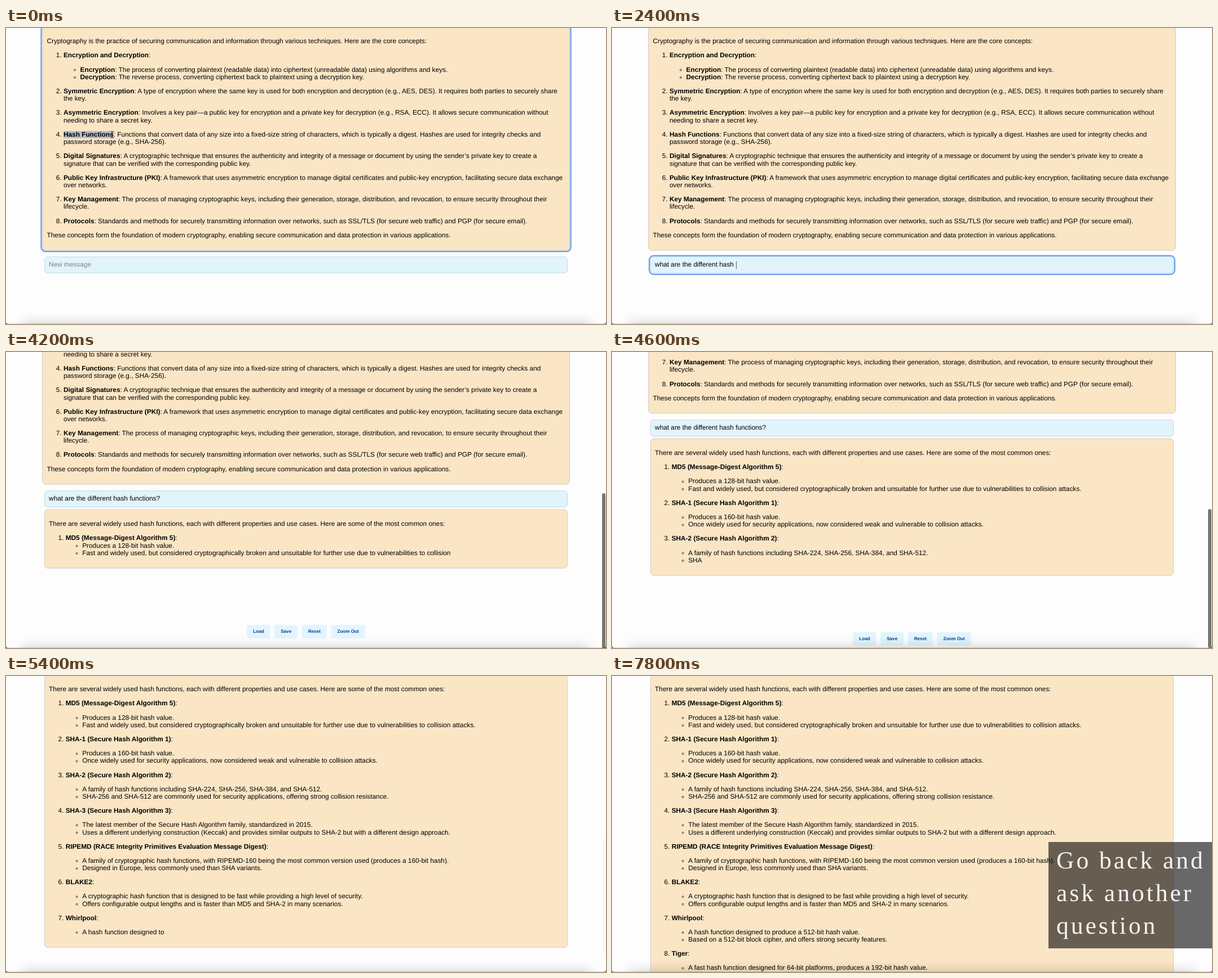
Recreate the animation shown at these times as an HTML page. Size 1064 px wide and 526 px high, loop 8000 ms.

```html
<!DOCTYPE html>
<html lang="en">
<head>
<meta charset="utf-8">
<title>Chat about cryptography</title>
<style>
html, body { margin: 0; width: 100%; height: 100%; overflow: hidden; background: #fdfdfe; }
body { position: relative; font-family: "Liberation Sans", Arial, sans-serif; text-rendering: geometricPrecision; }
#page { position: absolute; left: 0; top: 0; width: 1440px; height: 0; transform-origin: 0 0; font-size: 16px; line-height: 18px; color: #000; white-space: nowrap; }
.box { position: absolute; left: 92px; width: 1256px; box-sizing: border-box; padding: 10px; border: 1px solid #c3beb6; border-radius: 8px; background: #fae6c5; }
.box p { margin: 16px 0; }
.box ol { margin: 16px 0; padding-left: 40px; }
.box ul { margin: 0; padding-left: 40px; list-style: circle; }
.box.tight li p { margin: 0; }
#lesson { left: 87px; top: -3px; width: 1266px; height: 538px; }
#ask { top: 550px; height: 40px; background: #e1f4fc; border-color: #b9ccd4; white-space: pre; }
#ask.blank { color: #7c8285; }
#answer { top: 595px; }
.focus { outline: 3px solid #6a9be8; outline-offset: 1.5px; box-shadow: 0 0 0 1.5px #fff; }
.picked { background: #b2bbc8; }
#caret { position: absolute; top: 10px; width: 1.4px; height: 18px; background: #222; }
#tools { position: absolute; left: 0; width: 1440px; display: flex; justify-content: center; gap: 10px; }
#tools span { height: 32px; padding: 0 15px; border-radius: 5px; background: #e1f5fe; color: #0d3f8a; font: bold 11px/32px "Liberation Sans", Arial, sans-serif; }
#thumb { position: absolute; left: 1057px; width: 6px; border-radius: 3px; background: #757575; }
#mouse { position: absolute; left: 0; top: 0; width: 8px; height: 14px; }
#dock { position: absolute; left: 30px; right: 30px; top: 526px; height: 20px; box-shadow: 0 0 22px rgba(0,0,0,.22); }
#frame { position: absolute; inset: -10px 0 0; border-radius: 0 0 4px 4px; box-shadow: 0 0 0 4px #444, inset 0 -1px 0 rgba(0,0,0,.14); }
#note { position: absolute; left: 774px; top: 294.5px; width: 290px; height: 189.5px; box-sizing: border-box; padding: 4px 0 0 14px; background: rgba(0,0,0,.59); color: #f6f5f4; font: 43.5px/58px "Liberation Serif", "Times New Roman", serif; letter-spacing: 4px; white-space: nowrap; }
</style>
</head>
<body>
<div id="page">
  <div id="lesson" class="box">
    <p>Cryptography is the practice of securing communication and information through various techniques. Here are the core concepts:</p>
    <ol>
      <li><p><b>Encryption and Decryption</b>:</p>
        <ul>
          <li><b>Encryption</b>: The process of converting plaintext (readable data) into ciphertext (unreadable data) using algorithms and keys.</li>
          <li><b>Decryption</b>: The reverse process, converting ciphertext back to plaintext using a decryption key.</li>
        </ul></li>
      <li><p><b>Symmetric Encryption</b>: A type of encryption where the same key is used for both encryption and decryption (e.g., AES, DES). It requires both parties to securely share<br>the key.</p></li>
      <li><p><b>Asymmetric Encryption</b>: Involves a key pair—a public key for encryption and a private key for decryption (e.g., RSA, ECC). It allows secure communication without<br>needing to share a secret key.</p></li>
      <li><p><b id="term">Hash Functions</b>: Functions that convert data of any size into a fixed-size string of characters, which is typically a digest. Hashes are used for integrity checks and<br>password storage (e.g., SHA-256).</p></li>
      <li><p><b>Digital Signatures</b>: A cryptographic technique that ensures the authenticity and integrity of a message or document by using the sender’s private key to create a<br>signature that can be verified with the corresponding public key.</p></li>
      <li><p><b>Public Key Infrastructure (PKI)</b>: A framework that uses asymmetric encryption to manage digital certificates and public-key encryption, facilitating secure data exchange<br>over networks.</p></li>
      <li><p><b>Key Management</b>: The process of managing cryptographic keys, including their generation, storage, distribution, and revocation, to ensure security throughout their<br>lifecycle.</p></li>
      <li><p><b>Protocols</b>: Standards and methods for securely transmitting information over networks, such as SSL/TLS (for secure web traffic) and PGP (for secure email).</p></li>
    </ol>
    <p>These concepts form the foundation of modern cryptography, enabling secure communication and data protection in various applications.</p>
  </div>
  <div id="ask" class="box"><span id="typed"></span><span id="caret"></span></div>
  <div id="answer" class="box"></div>
  <div id="tools"><span>Load</span><span>Save</span><span>Reset</span><span>Zoom Out</span></div>
</div>
<div id="thumb"></div>
<svg id="mouse" viewBox="0 0 8 14"><path d="M1.5 1 Q4 1 4 3 Q4 1 6.5 1 M4 3 V11 M1.5 13 Q4 13 4 11 Q4 13 6.5 13 M2.8 9 H5.2" fill="none" stroke="#222" stroke-width="1"/></svg>
<div id="dock"></div>
<div id="frame"></div>
<div id="note">Go back and<br>ask another<br>question</div>
<script>
const LOOP = 8000, STEP = 200, SCALE = 1064 / 1440, VIEW = 712;
const $ = id => document.getElementById(id);
const clamp = (v, lo, hi) => Math.min(hi, Math.max(lo, v));

const question = "what are the different hash functions?";
const intro = "There are several widely used hash functions, each with different properties and use cases. Here are some of the most common ones:";
const items = [
  ["MD5 (Message-Digest Algorithm 5)",
    "Produces a 128-bit hash value.",
    "Fast and widely used, but considered cryptographically broken and unsuitable for further use due to vulnerabilities to collision attacks."],
  ["SHA-1 (Secure Hash Algorithm 1)",
    "Produces a 160-bit hash value.",
    "Once widely used for security applications, now considered weak and vulnerable to collision attacks."],
  ["SHA-2 (Secure Hash Algorithm 2)",
    "A family of hash functions including SHA-224, SHA-256, SHA-384, and SHA-512.",
    "SHA-256 and SHA-512 are commonly used for security applications, offering strong collision resistance."],
  ["SHA-3 (Secure Hash Algorithm 3)",
    "The latest member of the Secure Hash Algorithm family, standardized in 2015.",
    "Uses a different underlying construction (Keccak) and provides similar outputs to SHA-2 but with a different design approach."],
  ["RIPEMD (RACE Integrity Primitives Evaluation Message Digest)",
    "A family of cryptographic hash functions, with RIPEMD-160 being the most common version used (produces a 160-bit hash).",
    "Designed in Europe, less commonly used than SHA variants."],
  ["BLAKE2",
    "A cryptographic hash function that is designed to be fast while providing a high level of security.",
    "Offers configurable output lengths and is faster than MD5 and SHA-2 in many scenarios."],
  ["Whirlpool",
    "A hash function designed to produce a 512-bit hash value.",
    "Based on a 512-bit block cipher, and offers strong security features."],
  ["Tiger",
    "A fast hash function designed for 64-bit platforms, produces a 192-bit hash value."]
];
const full = intro + items.map(([title, ...points]) => title + ":" + points.join("")).join("");
const after = s => full.indexOf(s) + s.length;
const looseFrom = full.indexOf("SHA-1 (");

// time in ms, characters streamed so far
const stream = [
  [3700, 0],
  [4200, after("vulnerabilities to collision")],
  [4600, after("SHA-512.SHA")],
  [5400, after("A hash function designed to")],
  [5800, after("Tiger:")],
  [6000, full.length]
];

function track(keys, t) {
  if (t <= keys[0][0]) return keys[0][1];
  for (let i = 1; i < keys.length; i++) {
    const [t0, a] = keys[i - 1], [t1, b] = keys[i];
    if (t <= t1) return a + (b - a) * (t - t0) / (t1 - t0);
  }
  return keys[keys.length - 1][1];
}

function answerHtml(n) {
  const take = s => {
    const part = s.slice(0, n);
    n -= part.length;
    return part;
  };
  let html = `<p>${take(intro)}</p>`;
  if (n <= 0) return html;
  html += "<ol>";
  for (const [title, ...points] of items) {
    if (n <= 0) break;
    html += `<li><p><b>${take(title)}</b>${take(":")}</p><ul>`;
    for (const point of points) if (n > 0) html += `<li>${take(point)}</li>`;
    html += "</ul></li>";
  }
  return html + "</ol>";
}

function drawAsk(t) {
  const focused = t >= 400 && t < 3800;
  const count = clamp(Math.round(9 + 29 * (t - 1200) / 1800), 0, question.length);
  const text = question.slice(0, count);
  $("ask").className = "box" + (text ? "" : " blank") + (focused ? " focus" : "");
  $("typed").textContent = text;
  $("caret").style.left = 11 + $("typed").offsetWidth + "px";
  $("caret").style.display = focused && t < 3500 ? "" : "none";
  if (!text) $("typed").textContent = "New message";
}

function drawAnswer(t) {
  const n = Math.round(track(stream, t)), tight = n < looseFrom;
  const answer = $("answer");
  answer.style.display = n ? "" : "none";
  answer.classList.toggle("tight", tight);
  answer.innerHTML = answerHtml(n);
  const bottom = n ? 595 + answer.offsetHeight : 590;
  const scroll = n ? clamp(bottom - 538 + (tight ? 17.6 : 0), 0, 598) : 0;
  $("tools").style.top = bottom + 136 + "px";
  $("page").style.transform = `scale(${SCALE}) translateY(${-scroll}px)`;

  // 418 units of earlier chat lie above the first box, 174 below the last
  const total = 418 + bottom + 174, thumb = $("thumb").style;
  thumb.top = (418 + scroll) / total * 526 + "px";
  thumb.height = VIEW / total * 526 + "px";
  thumb.opacity = t < 3800 ? 0 : track([[5000, 1], [5200, .4], [5400, .04], [5600, 0]], t);
}

function drawMouse(t) {
  const x = track([[0, 188.5], [400, 215]], t), y = track([[0, 189.5], [400, 421]], t);
  $("mouse").style.transform = `translate(${x - 4}px, ${y - 7}px)`;
  $("mouse").style.display = t < 800 ? "" : "none";
}

function draw(t) {
  $("lesson").classList.toggle("focus", t < 400);
  $("term").classList.toggle("picked", t < 400);
  drawAsk(t);
  drawAnswer(t);
  drawMouse(t);
  $("note").style.opacity = clamp((t - 6800) / 1000, 0, 1);
}

let start, shown = -1;
function tick(now) {
  start ??= now;
  const t = Math.floor((now - start) % LOOP / STEP) * STEP;
  if (t !== shown) draw(shown = t);
  requestAnimationFrame(tick);
}
draw(0);
requestAnimationFrame(tick);
</script>
</body>
</html>
```
